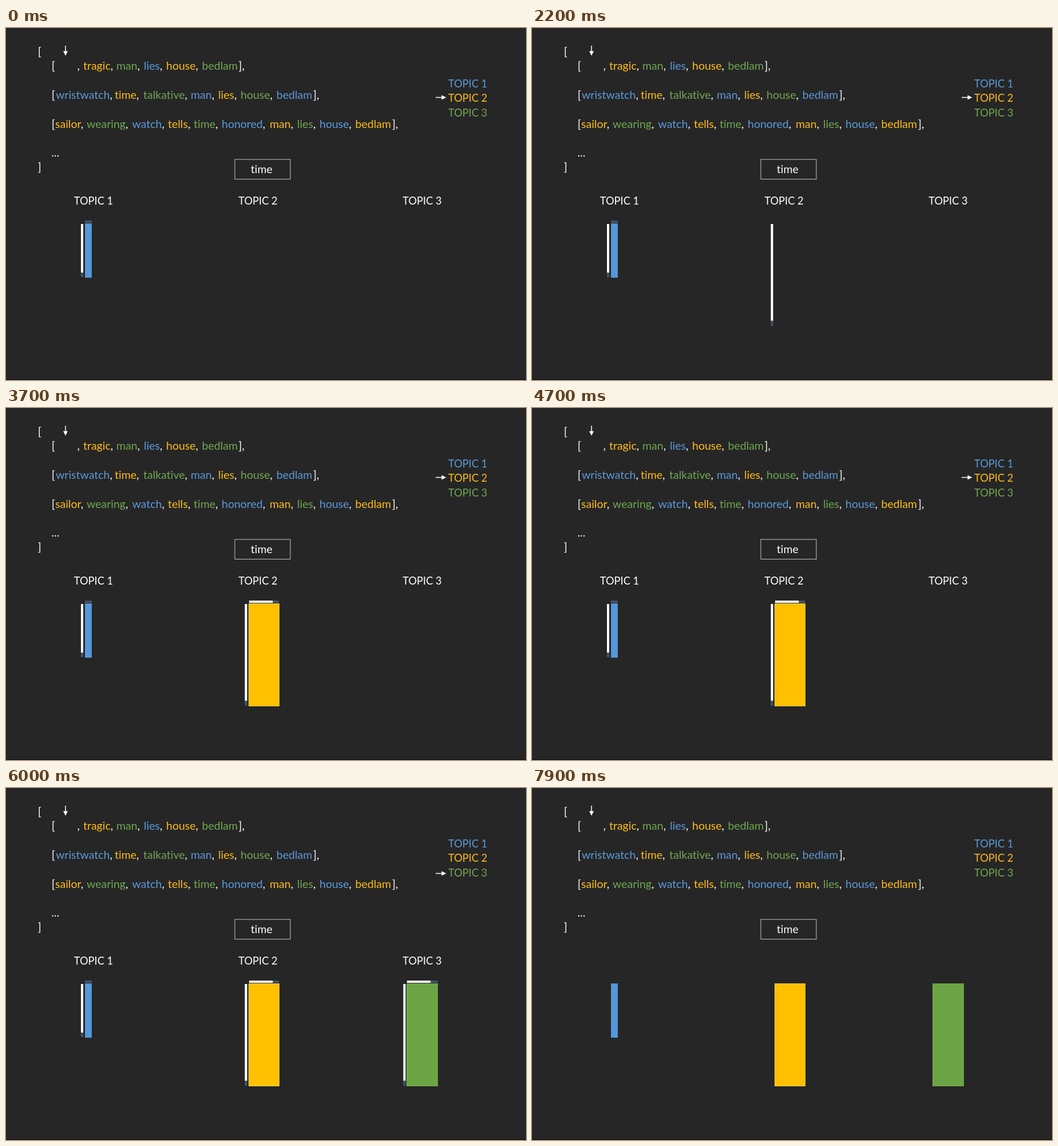
An HTML page for the animation above (8 s loop, 909 px wide and 616 px high).

```html
<!DOCTYPE html>
<html lang="en">
<head>
<meta charset="utf-8">
<title>Topic areas</title>
<style>
  html, body { margin: 0; width: 100%; height: 100%; overflow: hidden; background: #262626; }
  svg { display: block; width: 909px; height: 616px; }
  text { font: 19.5px Carlito, Lato, sans-serif; font-variant-ligatures: none; fill: #fff; white-space: pre; }
  text { font-family: Lato, sans-serif; }
  .caps { font-size: 18.3px; }
</style>
</head>
<body>
<svg id="stage" viewBox="0 0 909 616"></svg>
<script>
const LOOP = 8000;
const WHITE = '#fff', SLATE = '#44546a';
const INK = { b: '#5b9ada', y: '#ffbd16', g: '#6fa850' };
const stage = document.getElementById('stage');

function add(tag, attrs, parent = stage, content = '') {
  const node = document.createElementNS('http://www.w3.org/2000/svg', tag);
  for (const key in attrs) node.setAttribute(key, attrs[key]);
  node.textContent = content;
  parent.append(node);
  return node;
}
const group = () => add('g', {});
const rect = (x, y, width, height, fill, parent) =>
  add('rect', { x, y, width, height, fill }, parent);
const label = (x, y, content, fill = WHITE, parent = stage, name = '') =>
  add('text', { x, y, class: name, style: `fill:${fill}` }, parent, content);

// Each word is "colour:x:text"; a comma follows all but the last.
function sentence(y, list, endX) {
  const words = list.split(' ');
  words.forEach((word, i) => {
    const [ink, x, content] = word.split(':');
    const node = label(x, y, content, INK[ink]);
    if (i < words.length - 1) add('tspan', { style: 'fill:#fff' }, node, ',');
  });
  label(79.8, y, '[');
  label(endX, y, '],');
}

rect(0, 615, 909, 1, '#0c0c0c');
label(55.8, 47.8, '[');
label(124.5, 73.2, ',');
sentence(73.2, 'y:135:tragic g:193:man b:241:lies y:280:house g:342.5:bedlam', 406.5);
sentence(124, 'b:87:wristwatch y:190:time g:240:talkative b:323:man y:371:lies g:410:house b:472.8:bedlam', 537);
sentence(175, 'y:86:sailor g:141:wearing b:220.5:watch y:283:tells g:328:time b:377:honored ' +
  'y:461:man g:509:lies b:548:house y:610.5:bedlam', 675);
label(79.5, 225.2, '...');
label(55.8, 250.3, ']');

add('path', { d: 'M104 31V42', stroke: WHITE, 'stroke-width': 1.5 });
add('path', { d: 'M100 40.5H108L104 48.5Z', fill: WHITE });
add('rect', { x: 400, y: 230, width: 97, height: 34.5, fill: 'none', stroke: '#c4c4c4' });
label(427.8, 253.5, 'time');
['b', 'y', 'g'].forEach((ink, i) =>
  label(773, 104.2 + i * 25.2, `TOPIC ${i + 1}`, INK[ink], stage, 'caps'));

const pointer = group();
add('path', { d: 'M751 0H763', stroke: WHITE, 'stroke-width': 1.5 }, pointer);
add('path', { d: 'M761.5 -4V4L769.5 0Z', fill: WHITE }, pointer);

const guides = group();
[118.7, 406.2, 693.2].forEach((x, i) =>
  label(x, 309, `TOPIC ${i + 1}`, WHITE, guides, 'caps'));

// Side bar left of an area, top bar above it; the slate tip is the added share.
function sideBar(x, length, tip) {
  const bar = add('g', {}, guides);
  rect(x, 343, 4, length, WHITE, bar);
  rect(x, 343 + length, 4, tip, SLATE, bar);
  return bar;
}
function topBar(x, length, tip) {
  const bar = add('g', {}, guides);
  rect(x, 337, length, 4, WHITE, bar);
  rect(x + length, 337, tip, 4, SLATE, bar);
  return bar;
}
function area(x, width, height, fill, stroke) {
  return add('rect', { x: x + .5, y: 342.5, width: width - 1, height: height - 1, fill, stroke });
}

sideBar(131, 85, 8);
topBar(138, 0, 12);
area(138, 12, 95, '#5498db', '#5590cb');

const reveals = [
  [1300, sideBar(417.5, 169.5, 8.5)],
  [2400, topBar(425, 41.5, 10.5)],
  [3500, area(424, 54, 180, '#ffc000', '#ffd04a')],
  [5000, sideBar(694.5, 169.5, 8.5)],
  [5000, topBar(701, 41.5, 12)],
  [5000, area(700, 55, 180, '#6ca445', '#6fa84a')],
];

function draw(now) {
  const t = now % LOOP;
  for (const [start, node] of reveals)
    node.setAttribute('visibility', t >= start ? 'visible' : 'hidden');
  pointer.setAttribute('transform', `translate(0 ${t < 5000 ? 121.5 : 149.5})`);
  const shown = 1 - Math.min(1, Math.max(0, (t - 7300) / 400));
  pointer.setAttribute('opacity', shown);
  guides.setAttribute('opacity', shown);
}

const began = performance.now();
function tick() {
  draw(performance.now() - began);
  requestAnimationFrame(tick);
}
tick();
</script>
</body>
</html>
```
